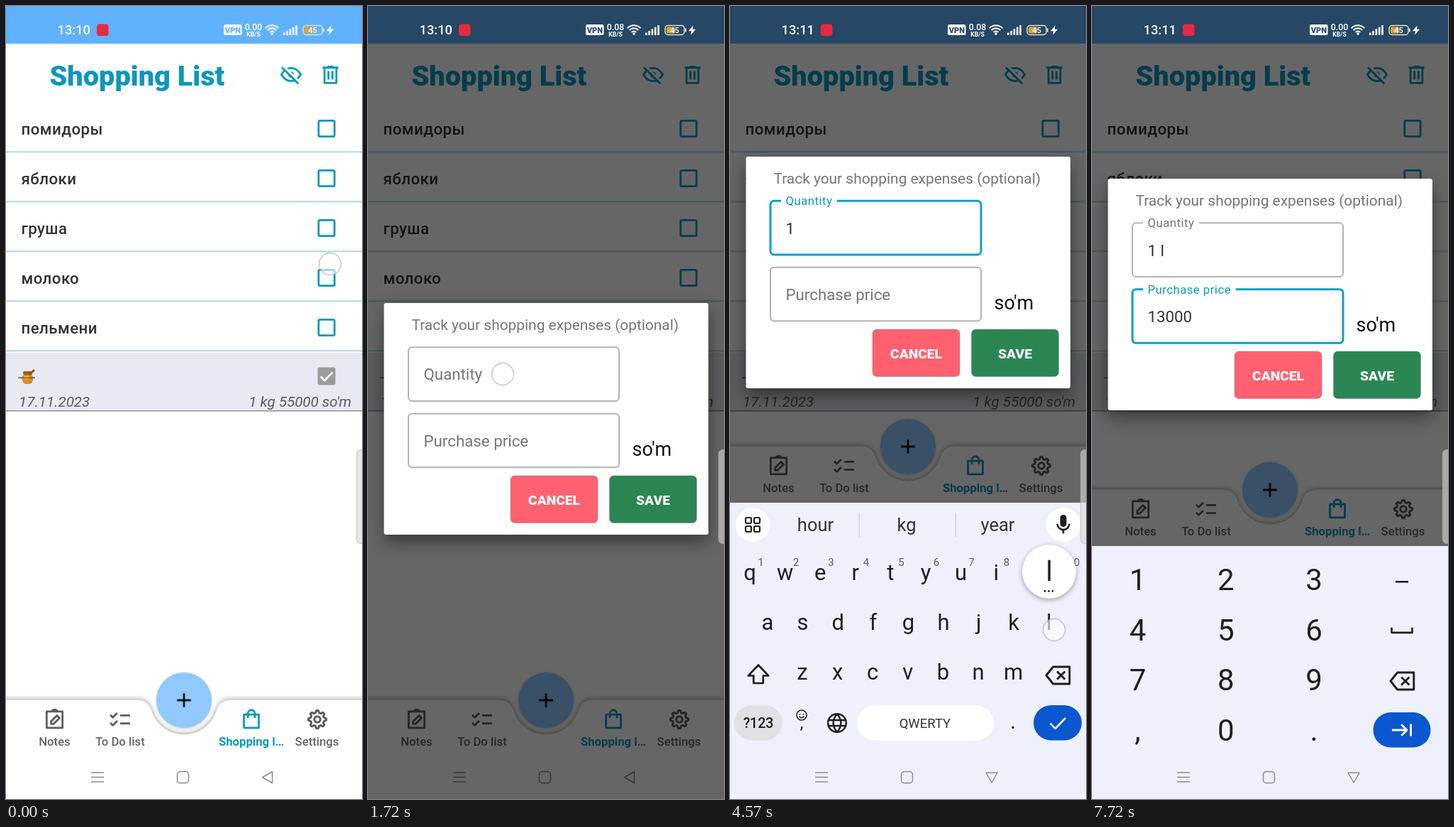
These frames come from a looping animation (502 px wide and 1116 px high, 8000 ms). An HTML page with a canvas:

```html
<!DOCTYPE html>
<html lang="en">
<head>
<meta charset="utf-8">
<title>Shopping list</title>
<style>
html, body { margin: 0; width: 100%; height: 100%; overflow: hidden; background: #fff; }
canvas { display: block; width: 100%; height: 100%; }
</style>
</head>
<body>
<canvas></canvas>
<script>
const W = 502, H = 1116, LOOP = 8000;
const TEAL = '#0c97bd', INK = '#1f1f1f', GREY = '#5c5c5c', BLUE = '#0b57d0';
const canvas = document.querySelector('canvas');
const c = canvas.getContext('2d');

// Timeline: [start, end, x, y] for touches, [time, value] for states
const touches = [
  [0, 620, 457, 363], [1680, 1850, 190, 518], [2780, 3000, 32, 1028],
  [3220, 3400, 30, 805], [3700, 3860, 35, 1022], [3990, 4130, 270, 1015],
  [4480, 4720, 457, 878], [5180, 5400, 200, 408], [6130, 6280, 66, 815],
  [6430, 6640, 318, 812], [6850, 6950, 190, 1022], [7010, 7100, 190, 1022],
  [7160, 7250, 190, 1022]
];
const quantity = [[0, ''], [3300, '1'], [4050, '1 '], [4700, '1 l']];
const price = [[0, ''], [6200, '1'], [6500, '13'], [6890, '130'], [7050, '1300'], [7200, '13000']];
const layouts = [[0, 'letters'], [3000, 'symbols'], [3860, 'letters'], [5430, 'digits']];
const words = [[0, ''], [3300, 'hour kg year'], [4700, 'large l lb']];
const clock = [[0, '13:10'], [3570, '13:11']];
const speed = [[0, '0.00'], [1500, '0.08'], [5140, '0.00']];
const FOCUS1 = 1830, FOCUS2 = 5400;

const at = (list, t) => list.filter(e => e[0] <= t).pop()[1];
const ramp = (t, a, b) => Math.min(1, Math.max(0, (t - a) / (b - a)));
const easeOut = p => 1 - (1 - p) ** 2;
const mix = (a, b, p) => a + (b - a) * p;

function text(s, x, y, size, color, { w = 400, al = 'left', ls = 0, it = '' } = {}) {
  c.font = `${it} ${w} ${size}px Roboto, sans-serif`;
  c.letterSpacing = ls + 'px';
  c.textAlign = al;
  c.fillStyle = color;
  c.fillText(s, x, y);
}
function box(x, y, w, h, r, fill, stroke, lw = 2) {
  c.beginPath();
  c.roundRect(x, y, w, h, r);
  if (fill) { c.fillStyle = fill; c.fill(); }
  if (stroke) { c.strokeStyle = stroke; c.lineWidth = lw; c.stroke(); }
}
function disc(x, y, r, fill, stroke, lw = 2) {
  box(x - r, y - r, 2 * r, 2 * r, r, fill, stroke, lw);
}
function withShadow(blur, dy, color, draw) {
  c.save();
  c.shadowBlur = blur; c.shadowOffsetY = dy; c.shadowColor = color;
  draw();
  c.restore();
}
// Icon on a 24-unit grid, centred on x, y
function icon(x, y, d, color, { k = 1.394, lw = 2, fill = false } = {}) {
  c.save();
  c.translate(x, y); c.scale(k, k); c.translate(-12, -12);
  c.fillStyle = c.strokeStyle = color; c.lineWidth = lw; c.lineJoin = 'round';
  const p = new Path2D(d);
  if (fill) c.fill(p, 'evenodd'); else c.stroke(p);
  c.restore();
}
function gear(x, y, r, color, solid) {
  c.beginPath();
  for (let i = 0; i < 32; i++) {
    const a = (i - 0.5) * Math.PI / 16, q = i % 4 < 2 ? r : r * 0.76;
    c.lineTo(x + q * Math.cos(a), y + q * Math.sin(a));
  }
  c.closePath();
  c.moveTo(x + r * 0.34, y);
  c.arc(x, y, r * 0.34, 0, 7);
  c.fillStyle = c.strokeStyle = color; c.lineWidth = 3; c.lineJoin = 'round';
  if (solid) c.fill('evenodd'); else c.stroke();
  c.lineJoin = 'miter';
}

function honey() {
  box(23, 517, 15, 15, 6, '#e58a1c');
  box(24, 514, 13, 5, 2, '#a85a14');
  box(25, 521, 8, 4, 2, '#ffc83d');
  icon(35, 517, 'M10 14L17 7', '#8a5522', { k: 1, lw: 3 });
  c.fillStyle = '#555'; c.fillRect(17, 522.5, 24, 1.5);
}

function page(t) {
  c.fillStyle = '#fff'; c.fillRect(0, 0, W, H);
  c.fillStyle = '#60b2ff'; c.fillRect(0, 0, W, 53);
  text('Shopping List', 61.5, 112, 39.7, TEAL, { w: 900 });

  const eye = [402, 96.5];
  icon(...eye, 'M2.2 12Q6 5.5 12 5.5T21.8 12Q18 18.5 12 18.5T2.2 12Z', TEAL);
  disc(...eye, 4.2, TEAL);
  icon(...eye, 'M4.5 3.5L21.5 20.5', '#fff', { lw: 2.2 });
  icon(...eye, 'M2.6 4.6L19.4 21.4', TEAL);
  icon(457.5, 96.5, 'M4 5H20M9 4H15M6 5V20.5H18V5M10 8.5V17M14 8.5V17', TEAL);

  ['помидоры', 'яблоки', 'груша', 'молоко', 'пельмени'].forEach((name, i) => {
    const y = 172.5 + 70 * i;
    text(name, 21.5, y + 8.5, 22.3, '#333', { w: 500, ls: 0.4 });
    box(440.8, y - 11.2, 22.4, 22.4, 2, null, TEAL, 2.8);
    c.fillStyle = '#b5daec'; c.fillRect(0, y + 31.7, W, 2.2);
  });
  if (t > 450 && t < 1500)
    disc(452, 382, 27 * easeOut(ramp(t, 450, 700)), `rgba(0,0,0,${0.1 * (1 - ramp(t, 1300, 1500))})`);

  c.fillStyle = '#e7eaf2'; c.fillRect(0, 488, W, 81);
  c.fillStyle = '#8c8c8c'; c.fillRect(0, 569, W, 1.5);
  honey();
  box(439.5, 508.5, 25, 25, 3, '#9c9c9c');
  icon(452, 521, 'M6 12.3L10 16.3L18 8.3', '#fff');
  text('17.11.2023', 18, 564, 20.6, GREY, { it: 'italic' });
  text("1 kg 55000 so'm", 487, 564, 20.6, GREY, { it: 'italic', al: 'right' });
}

function tabs(y) {
  c.save();
  c.translate(0, y);
  withShadow(7, -1, 'rgba(0,0,0,.38)', () => {
    c.fillStyle = '#fff';
    c.fill(new Path2D('M-9 976.5H182C200 976.5 203 985 206 994A48 48 0 0 0 296 994C299 985 302 976.5 320 976.5H511V1056H-9Z'));
  });
  c.fillStyle = '#fff'; c.fillRect(0, 1045, W, 71 - y);
  withShadow(4, 1, 'rgba(0,0,0,.2)', () => disc(251, 977, 39, '#90c8ff'));
  icon(251, 977, 'M5 12H19M12 5V19', '#111');

  icon(68.5, 1004, 'M4 4H20V20.5H4ZM9 3.5Q12 .5 15 3.5M8.5 16.5V14L14.5 8L17 10.5L11 16.5Z', GREY);
  icon(161, 1004, 'M2 7.5L4.5 10L9 5.5M2 15.5L4.5 18L9 13.5M12 8H22M12 16H22', GREY);
  icon(346, 1004, 'M4.5 7H19.5V20.5H4.5ZM8.5 10.5V6A3.5 3.5 0 0 1 15.5 6V10.5', TEAL);
  gear(439, 1004, 12.6, GREY);
  const label = (s, x, w, color) => text(s, x, 1041, 16.7, color, { w, al: 'center' });
  label('Notes', 68.5, 500, '#666');
  label('To Do list', 161, 500, '#666');
  label('Shopping l…', 346, 700, TEAL);
  label('Settings', 438.5, 500, '#666');
  c.restore();
}

function systemKeys(color, down) {
  c.fillStyle = color;
  for (const y of [1078, 1084.6, 1091]) c.fillRect(120, y, 18, 1.5);
  box(241.5, 1077.5, 16, 16, 4, null, color, 1.5);
  icon(369, 1085.5, down ? 'M4 5.5H20L12 19.5Z' : 'M18.5 4V20L4.5 12Z', color, { k: 1, lw: 1.5 });
}

function field(y, label, value, focused, float, caret) {
  const line = focused ? '#0aa0c8' : '#b2b2b2', lw = focused ? 3 : 2;
  box(57, y, 297, 75.6, 5, '#fff', line, lw);
  const size = mix(22.3, 16.7, float), ls = 0.5 * float;
  if (float > 0) {
    c.font = `${size}px Roboto, sans-serif`; c.letterSpacing = ls + 'px';
    c.fillStyle = '#fff';
    c.fillRect(72, y - 3, (c.measureText(label).width + 13) * float, 6);
  }
  text(label, 78.5, mix(y + 46, y + 6, float), size, focused ? TEAL : '#757575', { ls });
  text(value, 78.5, y + 46.7, 22.3, '#333');
  if (caret) {
    const x = 78.5 + c.measureText(value).width;
    c.fillStyle = TEAL; c.fillRect(x, y + 23, 2.4, 30);
  }
}

// The caret restarts its blink on focus and on each keystroke
function caretOn(t, list, focus) {
  const last = Math.max(focus, ...list.map(e => e[0]).filter(v => v <= t));
  return (t - last) % 1000 < 500;
}

function dialog(t, y) {
  withShadow(24, 10, 'rgba(0,0,0,.45)', () => box(22.5, y, 457.5, 326, 3, '#fff'));
  text('Track your shopping expenses (optional)', 61.5, y + 38, 20.9, '#757575');
  const on1 = t >= FOCUS1 && t < FOCUS2, on2 = t >= FOCUS2;
  field(y + 62.3, 'Quantity', at(quantity, t), on1, ramp(t, FOCUS1, FOCUS1 + 150),
    on1 && caretOn(t, quantity, FOCUS1));
  field(y + 155.7, 'Purchase price', at(price, t), on2, ramp(t, FOCUS2, FOCUS2 + 150),
    on2 && caretOn(t, price, FOCUS2));
  text("so'm", 372.5, y + 215, 27, '#111');
  const button = (x, s, color) => {
    box(x, y + 243, 123, 66.5, 6, color, 'rgba(120,120,120,.45)', 1);
    text(s, x + 61.5, y + 284, 19.2, '#fff', { w: 900, al: 'center' });
  };
  button(201, 'CANCEL', '#ff6170');
  button(340.5, 'SAVE', '#2b8653');
}

function backspace(x, y) {
  icon(x, y, 'M8 4.5H22.5V19.5H8L2 12ZM11.5 8.5L18.5 15.5M18.5 8.5L11.5 15.5', INK, { k: 1.6, lw: 1.8 });
}

function toolbar(suggest) {
  disc(32, 730, 24, '#fff');
  for (const x of [22, 34]) for (const y of [720, 732]) box(x, y, 8, 8, 2, null, INK, 2.2);
  disc(470, 730, 24, '#fff');
  box(465.5, 716, 9, 17, 4.5, INK);
  icon(470, 730, 'M5.5 11A6.5 6.5 0 0 0 18.5 11M12 17.5V21.5', INK, { k: 1.3 });
  if (suggest) {
    suggest.split(' ').forEach((s, i) => text(s, 120.5 + 128.5 * i, 738.5, 25.5, '#333', { al: 'center' }));
    c.fillStyle = '#cfd2da';
    c.fillRect(181.5, 713, 1.5, 34); c.fillRect(317.5, 713, 1.5, 34);
    return;
  }
  icon(141, 730, 'M4 4H20.5V14L14.5 20.5H4ZM14.5 20V14.5H20M8 13Q10 16 13 14.5M8.5 8V10M15.5 8V10', '#3a3a3a', { k: 1.4, lw: 2.2 });
  icon(250, 730, 'M4.5 4.5H19.5V20.5H4.5ZM9 4.5V3H15V4.5M8 9H16M8 12.5H16M8 16H13', '#3a3a3a', { k: 1.3, lw: 2.2 });
  gear(360, 730, 12.5, '#3a3a3a', true);
}

function fullKeys(t, symbols) {
  toolbar(at(words, t));
  const key = (s, x, y) => text(s, x, y, 31, INK, { al: 'center' });
  const row = (keys, x, y) => [...keys].forEach((s, i) => key(s, x + 49.6 * i, y));
  if (symbols) {
    row('1234567890', 28, 808);
    row('@#$_&-+()/', 28, 878);
    row('*"\':;!?', 102, 948);
    text('=\\<', 40, 946, 20, INK, { w: 500, al: 'center' });
  } else {
    row('qwertyuiop', 28, 808);
    [...'1234567890'].forEach((s, i) => text(s, 43.5 + 49.5 * i, 788, 15, GREY, { al: 'center' }));
    row('asdfghjkl', 53, 878);
    row('zxcvbnm', 102, 948);
    icon(40, 941, 'M12 3L21.5 13H16.5V20H7.5V13H2.5Z', INK, { k: 1.5, lw: 1.8 });
  }
  backspace(462, 942);

  box(6, 984, 68, 49.5, 25, '#e0e1e4');
  text(symbols ? 'ABC' : '?123', 40, 1015.5, 19.5, INK, { w: 500, al: 'center' });
  disc(101, 998, 7, null, INK, 1.6);
  icon(101, 998, 'M9.5 10V11.5M14.5 10V11.5M8.5 13.5Q12 18 15.5 13.5', INK, { k: 1, lw: 1.5 });
  text(',', 101, 1017, 24, INK, { al: 'center' });
  icon(151, 1009, 'M2.5 12A9.5 9.5 0 0 1 21.5 12A9.5 9.5 0 0 1 2.5 12M3.5 9H20.5M3.5 15H20.5M12 2.5Q4 12 12 21.5Q20 12 12 2.5', INK, { k: 1.35, lw: 1.8 });
  box(179, 984, 193, 49.5, 25, '#fff');
  text('QWERTY', 275, 1015.5, 18.5, '#333', { al: 'center' });
  key('.', 399, 1017);
  box(428, 984, 68, 49.5, 25, BLUE);
  icon(462, 1009, 'M4 12.5L9.5 18L20.5 6.5', '#fff', { k: 1.3 });

  if (!symbols && t >= 4480 && t < 4720) {
    withShadow(7, 2, 'rgba(0,0,0,.35)', () => disc(450, 796, 38, '#fff'));
    text('l', 450, 809, 38, INK, { al: 'center' });
    for (const x of [444, 449.5, 455]) disc(x, 823.5, 1.4, INK);
  }
}

function digitKeys() {
  ['123', '456', '789', ',0.'].forEach((row, r) =>
    [...row].forEach((s, i) => text(s, 64.5 + 124.3 * i, 822 + 70.7 * r, 42, INK, { al: 'center' })));
  c.fillStyle = INK; c.fillRect(428, 809, 18, 2.6);
  icon(437, 879, 'M2 9V14H22V9', INK, { k: 1.45, lw: 1.8 });
  backspace(437, 950);
  box(396.5, 994, 81, 49.5, 25, BLUE);
  icon(437, 1019, 'M2 12H17M11.5 6.5L17 12L11.5 17.5M21 6V18', '#fff', { k: 1.4 });
}

function keyboard(t) {
  const p = ramp(t, 2020, 2440);
  if (!p) return;
  const layout = at(layouts, t), digits = layout === 'digits';
  const top = digits ? 760 : 699;
  c.save();
  c.translate(0, 417 * (1 - p));
  c.fillStyle = '#eef1fb'; c.fillRect(0, top, W, H - top);
  if (digits) digitKeys(); else fullKeys(t, layout === 'symbols');
  systemKeys('#8b8d94', true);
  // Fade in: a thinning veil in the colour of the dimmed page
  c.fillStyle = `rgba(102,102,102,${Math.max(0, 0.6 - 0.67 * p)})`;
  c.fillRect(0, top, W, H - top);
  c.restore();
  if (p < 1) systemKeys('rgba(255,255,255,.35)', false);
}

function statusBar(t, dim) {
  const back = `rgb(${[96, 178, 255].map(v => v * (1 - dim) | 0)})`;
  text(at(clock, t), 72.5, 40, 18.3, '#fff', { w: 500 });
  box(128, 25.5, 16.5, 16.5, 3.5, '#e8293f');
  box(307, 26, 25.5, 15, 2.5, '#fff');
  text('VPN', 319.8, 37.7, 11, back, { w: 900, al: 'center' });
  text(at(speed, t), 349, 34, 12.3, '#fff', { w: 500, al: 'center' });
  text('KB/S', 349, 42.5, 8.6, '#fff', { w: 700, al: 'center' });
  c.strokeStyle = '#fff'; c.lineWidth = 2.1;
  for (const r of [4.5, 8.7, 12.8]) {
    c.beginPath(); c.arc(375, 40, r, -2.38, -0.76); c.stroke();
  }
  disc(375, 39, 1.8, '#fff');
  c.fillStyle = '#fff';
  for (let i = 0; i < 5; i++) c.fillRect(391 + 4.3 * i, 37.5 - 2.6 * i, 2.6, 3.5 + 2.6 * i);
  box(419, 27.5, 27, 13, 4, null, '#e9dfc0', 1.5);
  box(421, 29.5, 12, 9, 2, '#d9a63a');
  c.fillStyle = '#e9dfc0'; c.fillRect(447, 31.5, 1.8, 5);
  text('45', 432.5, 38, 11, '#fff', { w: 500, al: 'center' });
  icon(457, 34, 'M14 4L6 13.5H11L10 20L18 10.5H13Z', '#fff', { k: 0.85, fill: true });
}

function draw(t) {
  const dim = 0.6 * ramp(t, 1050, 1370);
  const tabY = t < 2030 ? 0 : t < 5430 ? -357 : -296;
  page(t);
  tabs(tabY);
  if (t < 2030) systemKeys('#8b8b8b', false);
  if (dim) {
    c.fillStyle = `rgba(0,0,0,${dim})`; c.fillRect(0, 0, W, H);
    c.globalAlpha = ramp(t, 1050, 1270);
    dialog(t, 418 - 206 * easeOut(ramp(t, 2000, 2445)) + 31 * easeOut(ramp(t, 5430, 5650)));
    c.globalAlpha = 1;
  }
  keyboard(t);
  statusBar(t, dim);
  box(494.5, 624.5, 16, 132, 6, 'rgba(215,215,215,.6)', 'rgba(180,180,180,.6)', 1.2);
  for (const [a, b, x, y] of touches)
    if (t >= a && t < b) disc(x, y, 15.5, 'rgba(255,255,255,.6)', 'rgba(170,176,200,.6)', 1.8);
}

function frame(now) {
  const k = devicePixelRatio || 1;
  const w = Math.round(innerWidth * k), h = Math.round(innerHeight * k);
  if (canvas.width !== w || canvas.height !== h) { canvas.width = w; canvas.height = h; }
  c.setTransform(w / W, 0, 0, h / H, 0, 0);
  draw((now - start) % LOOP);
  requestAnimationFrame(frame);
}
const start = performance.now();
requestAnimationFrame(n => frame(Math.max(n, start)));
</script>
</body>
</html>
```
